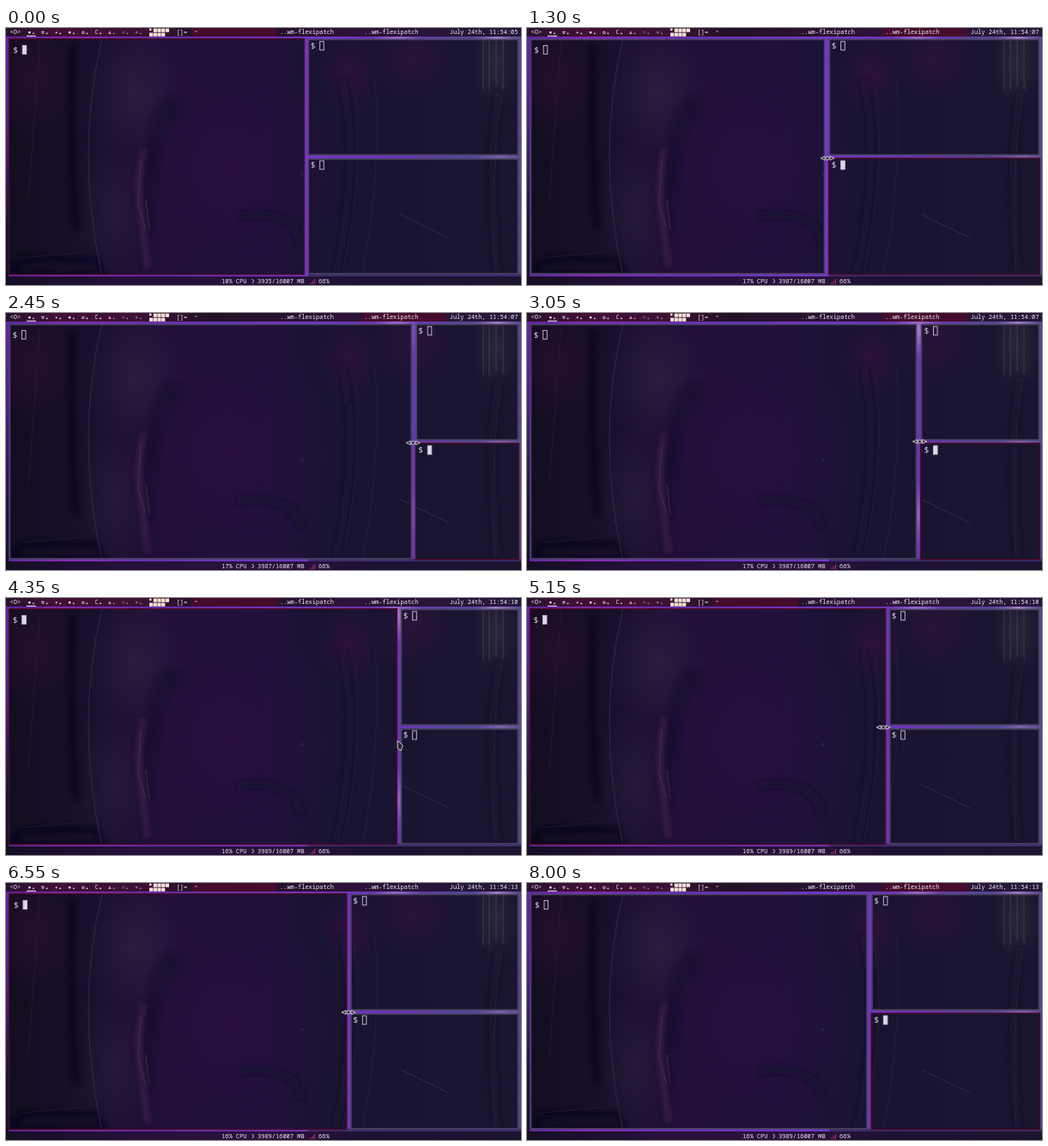
Recreate the animation shown at these times as an HTML page. Size 600 px wide and 300 px high, loop 8050 ms.

```html
<!DOCTYPE html>
<html lang="en">
<head>
<meta charset="utf-8">
<title>Tiling desktop</title>
<style>
html, body { margin: 0; width: 100%; height: 100%; overflow: hidden; background: #170d29; }
svg { display: block; width: 600px; height: 300px; }
text { font-family: "Noto Sans Mono", "DejaVu Sans Mono", monospace; white-space: pre; }
.bar text { font-size: 7px; font-weight: 500; fill: #f0ebf2; }
.bar .tag { font-size: 6.3px; font-weight: 400; }
.prompt { font-size: 9.8px; fill: #d5d0df; text-anchor: middle; }
</style>
</head>
<body>
<svg viewBox="0 0 600 300">
  <defs>
    <linearGradient id="gap">
      <stop offset="0" stop-color="#5b279b"/><stop offset=".12" stop-color="#812bb4"/>
      <stop offset=".3" stop-color="#6530b4"/><stop offset=".58" stop-color="#7338c6"/>
      <stop offset=".75" stop-color="#6a35b4"/><stop offset=".88" stop-color="#57459a"/>
      <stop offset="1" stop-color="#55458c"/>
    </linearGradient>
    <linearGradient id="leftgap" x2="0" y2="1">
      <stop offset="0" stop-color="#6a22a8"/><stop offset=".4" stop-color="#47207f"/>
      <stop offset=".8" stop-color="#1c1236"/><stop offset="1" stop-color="#171029"/>
    </linearGradient>
    <linearGradient id="topbar">
      <stop offset="0" stop-color="#28122f"/><stop offset=".1" stop-color="#421037"/>
      <stop offset=".27" stop-color="#3c1134"/><stop offset=".4" stop-color="#211126"/>
      <stop offset=".65" stop-color="#2d1238"/><stop offset="1" stop-color="#25173a"/>
    </linearGradient>
    <linearGradient id="bottombar">
      <stop offset="0" stop-color="#150e24"/><stop offset=".25" stop-color="#26103c"/>
      <stop offset=".55" stop-color="#28113c"/><stop offset=".7" stop-color="#1d1133"/>
      <stop offset="1" stop-color="#1d1430"/>
    </linearGradient>
    <linearGradient id="room">
      <stop offset="0" stop-color="#120d20"/><stop offset=".14" stop-color="#180f2a"/>
      <stop offset=".3" stop-color="#210f39"/><stop offset=".5" stop-color="#20103b"/>
      <stop offset=".64" stop-color="#191331"/><stop offset="1" stop-color="#1a152f"/>
    </linearGradient>
    <radialGradient id="magenta">
      <stop offset="0" stop-color="#5a1050" stop-opacity=".5"/><stop offset="1" stop-color="#5a1050" stop-opacity="0"/>
    </radialGradient>
    <radialGradient id="violet">
      <stop offset="0" stop-color="#321048" stop-opacity=".4"/><stop offset="1" stop-color="#2a1048" stop-opacity="0"/>
    </radialGradient>
    <radialGradient id="mist">
      <stop offset="0" stop-color="#484052" stop-opacity=".36"/><stop offset="1" stop-color="#484052" stop-opacity="0"/>
    </radialGradient>
    <radialGradient id="glow">
      <stop offset="0" stop-color="#d9a8e6" stop-opacity=".6"/><stop offset="1" stop-color="#b080e0" stop-opacity="0"/>
    </radialGradient>
    <filter id="soft" x="-50%" width="200%"><feGaussianBlur stdDeviation="2.5"/></filter>
    <clipPath id="panes"></clipPath>
  </defs>

  <rect width="600" height="300" fill="url(#gap)"/>
  <ellipse cx="455" cy="20" rx="30" ry="35" fill="url(#glow)"/>
  <ellipse cx="455" cy="235" rx="30" ry="40" fill="url(#glow)" opacity=".7"/>
  <ellipse cx="572" cy="12" rx="28" ry="20" fill="url(#glow)"/>
  <ellipse cx="575" cy="150" rx="30" ry="12" fill="url(#glow)" opacity=".5"/>
  <rect y="10" width="3" height="280" fill="url(#leftgap)"/>
  <path d="M352 288.5H600" stroke="#3c2c6c" stroke-width="3"/>

  <g clip-path="url(#panes)">
    <rect width="600" height="300" fill="url(#room)"/>
    <ellipse cx="265" cy="165" rx="130" ry="135" fill="url(#violet)"/>
    <ellipse cx="30" cy="60" rx="55" ry="70" fill="url(#magenta)" opacity=".45"/>
    <ellipse cx="400" cy="55" rx="35" ry="50" fill="url(#magenta)" opacity=".6"/>
    <ellipse cx="475" cy="35" rx="50" ry="50" fill="url(#magenta)" opacity=".5"/>
    <ellipse cx="150" cy="75" rx="60" ry="80" fill="url(#mist)" opacity=".8"/>
    <ellipse cx="125" cy="215" rx="45" ry="95" fill="url(#mist)" opacity=".6"/>
    <ellipse cx="570" cy="40" rx="30" ry="55" fill="url(#mist)"/>
    <path d="M183 82q15-6 22 6l-3 16q-15 12-20 30l-8 60-4 45h-9l-3-60q2-65 25-97z" fill="#190d2e" opacity=".6" filter="url(#soft)"/>
    <g filter="url(#soft)">
      <path d="M160 140q-8 40-3 75l8 65" fill="none" stroke="#46284f" stroke-width="7" opacity=".6"/>
      <path d="M20 270h85l8 18H4zM78 20Q72 110 82 235" fill="none" stroke="#0d0b19" stroke-width="10" opacity=".45"/>
      <path d="M392 60Q412 160 385 285M575 75Q560 150 572 285" fill="none" stroke="#12102a" stroke-width="9" opacity=".45"/>
      <path d="M270 220q40-8 65 12l10 20" fill="none" stroke="#170d2c" stroke-width="9" opacity=".6"/>
    </g>
    <path d="M112 12Q80 145 112 290" fill="none" stroke="#3b3446" opacity=".75"/>
    <path d="M40 12L26 200M18 268l72-6" fill="none" stroke="#28223a" opacity=".6"/>
    <path d="M157 155l-3 50 8 28M163 200l4 35" fill="none" stroke="#4a3550" opacity=".6" stroke-width="1.5"/>
    <g fill="none" stroke-linecap="round">
      <path d="M405 70Q420 160 392 285M430 60Q438 170 415 290M582 60Q562 150 570 285" stroke="#2d2b45" opacity=".5"/>
      <path d="M460 218L516 245" stroke="#49435a" opacity=".55"/>
      <path d="M556 12v60M563 12v60M571 12v55M579 12v58" stroke="#454a42" opacity=".4" stroke-width="2"/>
    </g>
    <circle cx="345" cy="171" r="2" fill="#302c4a" opacity=".7"/>
  </g>

  <g id="windows"></g>

  <g class="bar">
    <rect width="600" height="10" fill="url(#topbar)"/>
    <rect y="290" width="600" height="10" fill="url(#bottombar)"/>
    <rect id="tab" y="0" width="98" height="10" fill="#500a2b" opacity=".75"/>
    <text x="4.5" y="7.3">&lt;O&gt;</text>
    <g id="tags"></g>
    <path d="M24 9.3h11" stroke="#f2edf2"/>
    <g id="grid" fill="#f3e5d8"></g>
    <text x="198.5" y="7.3">[]=</text>
    <text x="219.5" y="7.3">~</text>
    <text x="319" y="7.3">..wm-flexipatch</text>
    <text x="417.5" y="7.3">..wm-flexipatch</text>
    <text id="clock" x="516.7" y="7.3"></text>
    <text id="cpu" x="251" y="297.7"></text>
    <path d="M286.5 293.5a2 2 0 0 1 0 4" fill="none" stroke="#e5dfe7" stroke-width=".8"/>
    <text id="memory" x="293" y="297.7"></text>
    <path d="M355 299v-2M357.3 299v-4M359.6 299v-6" stroke="#a32a66" stroke-width="1.2"/>
    <text x="364" y="297.7">66%</text>
  </g>

  <g id="pointer" stroke="#d8d5de" stroke-width=".9" fill="#2b2833">
    <path id="arrow" d="M0 0L6.3 5.5 4.3 11.5.3 9z"/>
    <g id="resize"><path d="M-8 0l5-2.3v4.6zM8 0l-5-2.3v4.6z"/><circle r="2"/></g>
  </g>
</svg>
<script>
const LOOP = 8050;
const $ = id => document.getElementById(id);
const set = (el, attrs) => {
  for (const key in attrs) el.setAttribute(key, attrs[key]);
  return el;
};
const add = (parent, name, attrs, text = "") => {
  const el = set(document.createElementNS("http://www.w3.org/2000/svg", name), attrs);
  el.textContent = text;
  return parent.appendChild(el);
};

// time, split x, left cursor x, right cursor offset from the split
const LAYOUT = [
  [0, 349.5, 19.2, 16.2], [1400, 349.5, 19.2, 16.2], [1780, 497, 18.6, 15.5],
  [1900, 492.5, 18.2, 15], [3050, 456.5, 18.7, 17], [3300, 457.5, 18.7, 16.2],
  [4900, 457.5, 18.7, 16.2], [5500, 367, 18, 15.5], [5700, 374.5, 17.5, 15],
  [6500, 399, 20, 16.3]
];
// time, x, y
const POINTER = [
  [1100, 350, 152], [1400, 350, 152], [1750, 499, 153], [1900, 489.5, 153],
  [3050, 457.5, 150], [3500, 457, 152], [4350, 456, 166.5], [4700, 457, 152],
  [4900, 457, 151], [5450, 365, 151], [5700, 383, 151], [6500, 399, 151]
];
// time, value
const FOCUS = [[0, 0], [1000, 2], [3900, 0], [6800, 2]];
const STATUS = [
  [0, "05", "10", "3935"], [900, "07", "17", "3987"],
  [3700, "10", "16", "3989"], [6500, "13", "16", "3989"]
];

const latest = (keys, t) => keys.filter(k => k[0] <= t).pop();
function tween(keys, t) {
  const next = keys.findIndex(k => k[0] > t);
  if (next < 1) return keys[next < 0 ? keys.length - 1 : 0].slice(1);
  const a = keys[next - 1], b = keys[next];
  const p = (t - a[0]) / (b[0] - a[0]);
  return a.slice(1).map((v, i) => v + (b[i + 1] - v) * p);
}

[..."●☢✦●✪C▲◎◉"].forEach((glyph, i) => {
  const fill = i < 6 ? "#eee6ee" : i === 6 ? "#d08a9a" : "#9a8a9a";
  add($("tags"), "text", { class: "tag", x: 25.5 + i * 15.6, y: 7.2, style: `fill:${fill}` }, glyph);
  add($("tags"), "circle", { cx: 32 + i * 15.6, cy: 6.3, r: .9, fill });
});
for (let i = 0; i < 9; i++) {
  const size = i ? 4.2 : 2.5;
  add($("grid"), "rect", { x: 167 + i % 5 * 4.7, y: i < 5 ? .6 : 5.6, width: size, height: size });
}

const panes = [25.4, 20.8, 160].map(promptY => ({
  promptY,
  clip: add($("panes"), "rect", {}),
  frame: add($("windows"), "rect", { fill: "none" }),
  sign: add($("windows"), "text", { class: "prompt", y: promptY + 3.2 }, "$"),
  cursor: add($("windows"), "rect", { width: 4.6, height: 10, y: promptY - 5, stroke: "#cbc5d6", "stroke-width": .9 })
}));

function placePane(pane, x, y, right, bottom, cursorX, focused) {
  const grow = focused ? 1 : 0;
  const box = {
    x: x - grow, y: y - grow,
    width: right - x + 2 * grow, height: bottom - y + 2 * grow
  };
  set(pane.clip, box);
  set(pane.frame, { ...box, stroke: focused ? "#520a26" : "#47435c", "stroke-width": focused ? 1.3 : 1.6 });
  set(pane.sign, { x: cursorX - 8 });
  set(pane.cursor, { x: cursorX, fill: focused ? "#dcd8e8" : "none" });
}

function render(t) {
  const [split, leftCursor, offset] = tween(LAYOUT, t);
  const focus = latest(FOCUS, t)[1];
  const right = split + 3, rightCursor = split + offset;
  placePane(panes[0], 4.5, 13.5, split - 3, 286.7, leftCursor, focus === 0);
  placePane(panes[1], right, 13.5, 596.5, 148, rightCursor, focus === 1);
  placePane(panes[2], right, 153, 596.5, 286.7, rightCursor, focus === 2);
  set($("tab"), { x: focus === 0 ? 217 : 414.5 });

  const [, seconds, cpu, memory] = latest(STATUS, t);
  $("clock").textContent = `July 24th, 11:54:${seconds}`;
  $("cpu").textContent = `${cpu}% CPU`;
  $("memory").textContent = `${memory}/16007 MB`;

  const [x, y] = tween(POINTER, t);
  const resting = t >= 3500 && t < 4700;
  set($("pointer"), {
    transform: `translate(${x} ${y})`,
    visibility: t >= 1100 && t < 7000 ? "visible" : "hidden"
  });
  $("arrow").style.display = resting ? "" : "none";
  $("resize").style.display = resting ? "none" : "";
}

const start = performance.now();
function tick() {
  const t = (performance.now() - start) % LOOP;
  render(Math.floor(t / 50) * 50);
  requestAnimationFrame(tick);
}
render(0);
requestAnimationFrame(tick);
</script>
</body>
</html>
```
